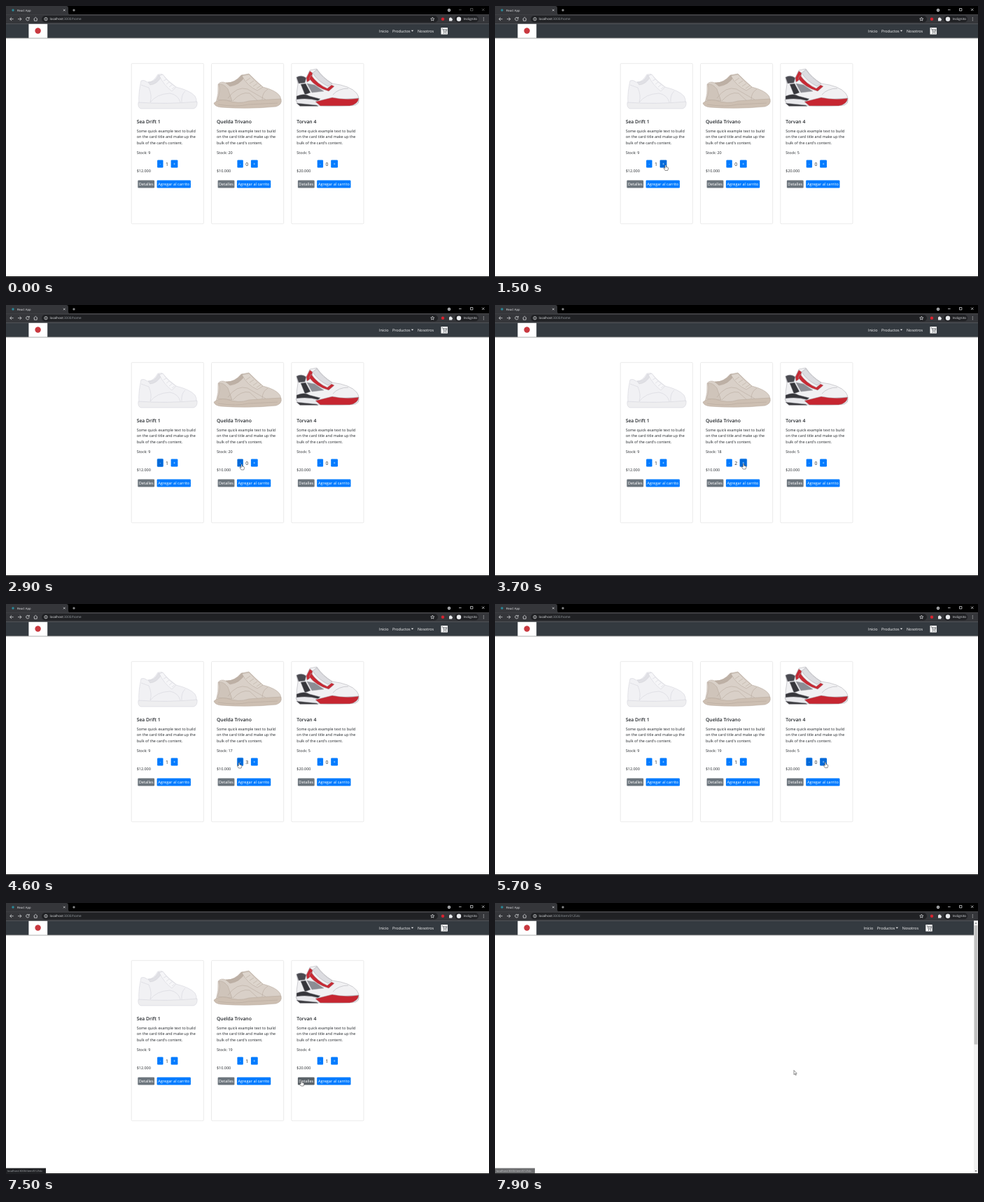
An HTML page for the animation above (8 s loop, 690 by 388 pixels).

```html
<!DOCTYPE html>
<html lang="es">
<head>
<meta charset="utf-8">
<title>React App</title>
<style>
html, body { margin: 0; width: 100%; height: 100%; overflow: hidden; background: #fff; }
svg { display: block; font-family: "Open Sans", "Noto Sans", sans-serif; font-size: 5.45px; text-rendering: geometricPrecision; }
.line { fill: none; stroke: #e8eaed; stroke-width: .7; }
.mid { text-anchor: middle; }
.btn { fill: #007bff; }
.btn.grey { fill: #6c757d; }
.btn.hot { fill: #0069d9; }
.btn.grey.hot { fill: #5a6268; }
.btn.focus { stroke: #80bdff; stroke-width: 1.1; paint-order: stroke; }
</style>
</head>
<body>
<svg id="stage" width="690" height="388" viewBox="0 0 690 388"></svg>
<script>
const LOOP = 8000, STEP = 100, PITCH = 114.3, LEAVE = 7700, PRESS = 200;
const stage = document.getElementById('stage');
const $ = id => document.getElementById(id);

const rect = (x, y, w, h, fill, more = '') => `<rect x="${x}" y="${y}" width="${w}" height="${h}" fill="${fill}" ${more}/>`;
const dot = (x, y, r, fill) => `<circle cx="${x}" cy="${y}" r="${r}" fill="${fill}"/>`;
const path = (d, fill, more = '') => `<path d="${d}" fill="${fill}" ${more}/>`;
const line = d => `<path class="line" d="${d}"/>`;
const text = (x, y, s, fill = '#212529', more = '') => `<text x="${x}" y="${y}" fill="${fill}" ${more}>${s}</text>`;

const whiteShoe = [
  ['M190 140C189 128 191 116 193 107Q197 105 202 109Q210 110 217 98L223 97.5Q232 108 243 116Q263 121 270 129Q273 133 272 140Z', '#f1f1f4'],
  ['M193 113L204 117Q209 128 206 138', 'none'],
  ['M203 109Q212 110 218 99L222 101Q216 112 206 113Z', '#e0e0e5'],
  ['M219 100L224 98Q232 110 243 116L237 122Q226 114 219 100Z', '#f6f6f8'],
  ['M225 107l4-2M229 112l4-3M233 116l4-3M237 119l4-3', 'none'],
  ['M206 138Q215 126 234 125Q246 127 249 138', 'none'],
  ['M251 138Q250 127 256 122', 'none'],
  ['M189 138Q230 141 273 137Q274 145 268 147H193Q188 146 189 138Z', '#eeeef0']
];
const beigeShoe = [
  ['M300 138Q304 126 303 112Q307 107 314 110Q326 111 336 99L347 97Q357 107 367 116Q387 121 392 130Q394 136 390 140Z', '#d9d0c8'],
  ['M302 134Q307 121 304 112Q311 111 317 119L323 136Z', '#cfc4ba'],
  ['M314 110Q327 111 337 99L341 101Q334 113 320 115Z', '#bdb0a5'],
  ['M337 100L347 98Q357 109 367 116L359 121Q345 115 337 100Z', '#ddd5cd'],
  ['M343 107l6-4M348 111l6-4M353 115l6-4M358 118l6-4', 'none'],
  ['M317 132Q330 114 345 119Q360 128 371 134M324 136Q336 122 348 125L360 136', 'none'],
  ['M366 134Q366 124 374 119', 'none'],
  ['M297 139Q304 133 315 135Q332 141 347 136Q371 134 393 133Q395 141 386 144Q346 148 307 145Q298 144 297 139Z', '#cdbfb2'],
  ['M303 141Q330 145 346 141L388 139', 'none']
];
const redShoe = [
  ['M416 137Q414 124 417 112L415 102Q422 98 429 103L434 92L444 90Q452 102 466 111Q492 114 501 125Q506 132 503 139Z', '#f1f1f3'],
  ['M415 102Q422 98 429 103L427 110L418 111Z', '#4a4a50'],
  ['M429 103L434 93L438 96Q437 106 430 109Z', '#c72a34'],
  ['M438 96L444 91Q453 104 466 111L460 115Q446 108 438 96Z', '#dcdce0'],
  ['M436 99Q445 112 459 118L465 113L469 115L461 122Q443 117 433 104Z', '#c72a34'],
  ['M430 111L441 113L454 122L437 124Z', '#8c8d94'],
  ['M421 112L428 111L435 124L427 127Z', '#36363b'],
  ['M415 129Q426 124 434 129L449 133L444 137H415Z', '#36363b'],
  ['M467 127Q475 118 489 118', 'none'],
  ['M414 134Q431 131 447 136L503 132Q506 139 499 142Q462 145 417 141Z', '#e9e9ec'],
  ['M442 137L466 131Q486 135 504 132Q503 141 491 143H449Z', '#c62631'],
  ['M415 139L444 142L446 143.5H420Z', '#3c3c40']
];
const goods = [
  { name: 'Sea Drift 1', price: '$12.000', total: 10, shoe: whiteShoe, edge: '#cfcfd6' },
  { name: 'Quelda Trivano', price: '$10.000', total: 20, shoe: beigeShoe, edge: '#b3a598' },
  { name: 'Torvan 4', price: '$20.000', total: 5, shoe: redShoe, edge: '#a5a5aa' }
];

// Every clickable area, also used for hover tests
const buttons = [];
function button(id, x, y, w, h, label, kind = '') {
  buttons.push({ id, x, y, w, h });
  return `<rect id="${id}" class="btn ${kind}" x="${x}" y="${y}" width="${w}" height="${h}" rx="1.2"/>` +
    text(x + w / 2, y + h / 2 + 2, label, '#fff', 'class="mid" font-size="5.6"');
}

function card(g, i) {
  const x = 179 + i * PITCH, left = x + 7.7;
  const copy = ['Some quick example text to build', 'on the card title and make up the', "bulk of the card's content."];
  return rect(x + .2, 82.3, 103.2, 229.5, '#fff', 'rx="1.4" stroke="#dcdcdc" stroke-width=".6"') +
    g.shoe.map(([d, fill]) => path(d, fill, `stroke="${g.edge}" stroke-width=".5"`)).join('') +
    text(left, 168.4, g.name, '#212529', 'font-size="6.8" font-weight="600"') +
    copy.map((s, n) => text(left, 180.7 + n * 8.6, s)).join('') +
    text(left, 212.4, '', '#212529', `id="stock${i}"`) +
    button('minus' + i, x + 37.1, 220.4, 8.4, 11, '-') +
    button('plus' + i, x + 56.6, 220.4, 9.8, 11, '+') +
    text(x + 51, 228.6, '', '#212529', `id="count${i}" class="mid" font-size="6.9"`) +
    text(left, 237.9, g.price) +
    button('more' + i, x + 9.3, 249.5, 23.8, 11, 'Detalles', 'grey') +
    button('add' + i, x + 36.6, 249.5, 48.3, 11, 'Agregar al carrito');
}

const browser =
  rect(0, 0, 690, 12.5, '#000') + path('M0 0H86Q89 0 89 3V9Q89 12.5 92 12.5H0Z', '#35363a') +
  dot(10, 6, 1.7, '#2b8a9b') + text(16, 7.7, 'React App', '#e8eaed', 'font-size="4.2"') +
  line('M82 4.7l2.6 2.6m0-2.6l-2.6 2.6M95.2 6h3.6M97 4.2v3.6') +
  dot(633, 6, 2.2, '#c4c6c9') + path('M631.9 5.5h2.2l-1.1 1.4z', '#111') +
  '<g id="controls">' + line('M647 5.5h3.6M663.5 3.5h3.4v3.4h-3.4zM680 3.6l3.4 3.4m0-3.4l-3.4 3.4') + '</g>' +
  rect(0, 12.3, 690, 13, '#35363a') + rect(51, 14, 566, 9.4, '#202124', 'rx="4.7"') +
  line('M10.7 18.7H5.8m2.3-2.4l-2.4 2.4 2.4 2.4M17 18.7h4.9m-2.3-2.4l2.4 2.4-2.4 2.4M32.8 17.2a2.3 2.3 0 1 0 .4 2M33.3 15.8v2h-2M39.5 18.8l2.8-2.6 2.8 2.6M40.4 18.4v2.8h3.8v-2.8') +
  `<circle class="line" cx="57" cy="18.7" r="2.2"/>` + line('M57 18.4v1.5M57 17.2v.6') +
  `<text x="62.5" y="20.4" font-size="4.6" fill="#9aa0a6"><tspan fill="#e8eaed">localhost</tspan>:3000<tspan id="route"></tspan></text>` +
  line('M609.3 16.2l.8 1.7 1.8.2-1.4 1.2.4 1.8-1.6-1-1.6 1 .4-1.8-1.4-1.2 1.8-.2z') +
  dot(624, 18.7, 2.2, '#d8232f') +
  path('M633 17.2h1.2a.9.9 0 0 1 1.8 0h1.2v1.3a.9.9 0 0 1 0 1.8v1.2H633z', '#e8eaed') +
  rect(641, 14.1, 34, 9.2, '#202124', 'rx="4.6"') + dot(647, 18.7, 3.2, '#e8eaed') +
  text(653.4, 20.3, 'Incógnito', '#e8eaed', 'font-size="4.5"') +
  [16.7, 18.7, 20.7].map(y => dot(682.3, y, .55, '#e8eaed')).join('');

const navbar =
  rect(0, 45, 690, 2.5, 'url(#shade)') + rect(0, 25.2, 690, 20.4, '#343a40') +
  rect(32.4, 25.6, 26.8, 20.2, '#fff') + dot(45.6, 35.5, 4.2, '#c9383f') +
  '<g id="links">' + text(533, 37.7, 'Inicio', '#fff') + text(552, 37.7, 'Productos', '#fff', 'font-size="5.4"') +
  path('M578.8 34.8h3.4l-1.7 1.7z', '#fff') + text(588, 37.7, 'Nosotros', '#fff') +
  rect(621.5, 31, 9.4, 9.6, '#fff') +
  path('M622.7 32.6h1.3l1.1 4.4h3.9l.9-3.4h-5.5M625.3 35.2h4.2', 'none', 'stroke="#343a40" stroke-width=".6"') +
  dot(625.7, 38.7, .7, '#343a40') + dot(628.6, 38.7, .7, '#343a40') + '</g>';

const scrollbar = '<g id="scroll">' + rect(684, 25.2, 6, 362, '#f1f1f1') + rect(684.6, 32, 4.8, 170.5, '#c1c1c1') +
  path('M685.5 29.6h3l-1.5-1.7zM685.5 383h3l-1.5 1.7z', '#505050') + '</g>';

stage.innerHTML =
  `<defs><linearGradient id="shade" x2="0" y2="1"><stop stop-color="#000" stop-opacity=".5"/><stop offset="1" stop-opacity="0"/></linearGradient></defs>` +
  rect(0, 0, 690, 388, '#fff') + '<g id="cards">' + goods.map(card).join('') + '</g>' +
  navbar + browser + scrollbar + rect(0, 387, 690, 1, '#0c0c0c') +
  '<g id="status">' + rect(0, 379.6, 57, 8.4, '#202124') +
  text(1.8, 385.3, 'localhost:3000/item/01254c', '#a5a8ac', 'font-size="3.9"') + '</g>' +
  '<g id="cursor" stroke="#222" stroke-width=".5" stroke-linejoin="round">' +
  path('M0 0V6.2L1.5 4.9 2.5 7.1 3.4 6.7 2.4 4.6H4.3Z', '#fff', 'id="arrow"') +
  path('M-.8.8Q0-.6.8.8V3L3.2 3.6Q4 4 3.8 5.5L3 8H-.6L-2.6 5Q-2.8 3.8-1.8 4.2L-.8 5Z', '#fff', 'id="hand"') + '</g>';

// Pointer stops: time, x, y
const stops = [
  [100, 520, 120], [900, 262, 246], [1400, 243.7, 227.5], [1900, 243.7, 227.5], [2200, 220, 227], [2600, 220, 227],
  [2900, 336.7, 228], [3000, 338, 228], [3200, 355, 227], [4100, 355, 227], [4400, 333, 227], [5100, 333, 227],
  [5400, 448, 227], [5500, 448, 227], [5700, 472, 226.5], [6500, 472, 226.5], [7100, 422, 254], [7600, 422, 254],
  [7900, 427, 239.5]
];
// Clicks: release time, button, card, new count; focus comes with the press just before
const clicks = [
  [1800, 'plus0', 0, 2], [2400, 'minus0', 0, 1], [3400, 'plus1', 1, 1], [3700, 'plus1', 1, 2], [4100, 'plus1', 1, 3],
  [4700, 'minus1', 1, 2], [5000, 'minus1', 1, 1], [5600, 'minus2', 2, 0], [6000, 'plus2', 2, 1], [6700, '', 2, 1]
];

function pointer(t) {
  const n = stops.findIndex(s => s[0] >= t);
  if (n < 1) return stops[0].slice(1);
  const [a, b] = [stops[n - 1], stops[n]];
  const k = (t - a[0]) / (b[0] - a[0]), e = k * k * (3 - 2 * k);
  return [a[1] + (b[1] - a[1]) * e, a[2] + (b[2] - a[2]) * e];
}

const show = (id, on) => $(id).setAttribute('visibility', on ? 'visible' : 'hidden');

function draw(t) {
  const [x, y] = pointer(t), away = t >= LEAVE;
  const counts = [1, 0, 0];
  let focus = '';
  for (const [at, id, i, n] of clicks) {
    if (at - PRESS <= t) focus = id;
    if (at <= t) counts[i] = n;
  }

  let over = '';
  for (const b of buttons) {
    const hit = t >= 100 && !away && x >= b.x && x <= b.x + b.w && y >= b.y && y <= b.y + b.h;
    if (hit) over = b.id;
    $(b.id).classList.toggle('hot', hit || focus === b.id);
    $(b.id).classList.toggle('focus', focus === b.id);
  }
  goods.forEach((g, i) => {
    $('stock' + i).textContent = 'Stock: ' + (g.total - counts[i]);
    $('count' + i).textContent = counts[i];
  });

  $('route').textContent = away ? '/item/01254c' : '/home';
  $('links').setAttribute('transform', `translate(${away ? -6.2 : 0})`);
  $('controls').setAttribute('opacity', t < 1000 ? .45 : 1);
  show('cards', !away);
  show('scroll', away);
  show('status', away || over === 'more2');
  $('status').setAttribute('opacity', t >= 7900 ? .65 : 1);
  show('arrow', t >= 100 && !over);
  show('hand', over);
  $('cursor').setAttribute('transform', `translate(${x} ${y})`);
}

const start = performance.now();
function tick() {
  const t = (performance.now() - start) % LOOP;
  draw(Math.floor(t / STEP) * STEP);
  requestAnimationFrame(tick);
}
tick();
</script>
</body>
</html>
```
